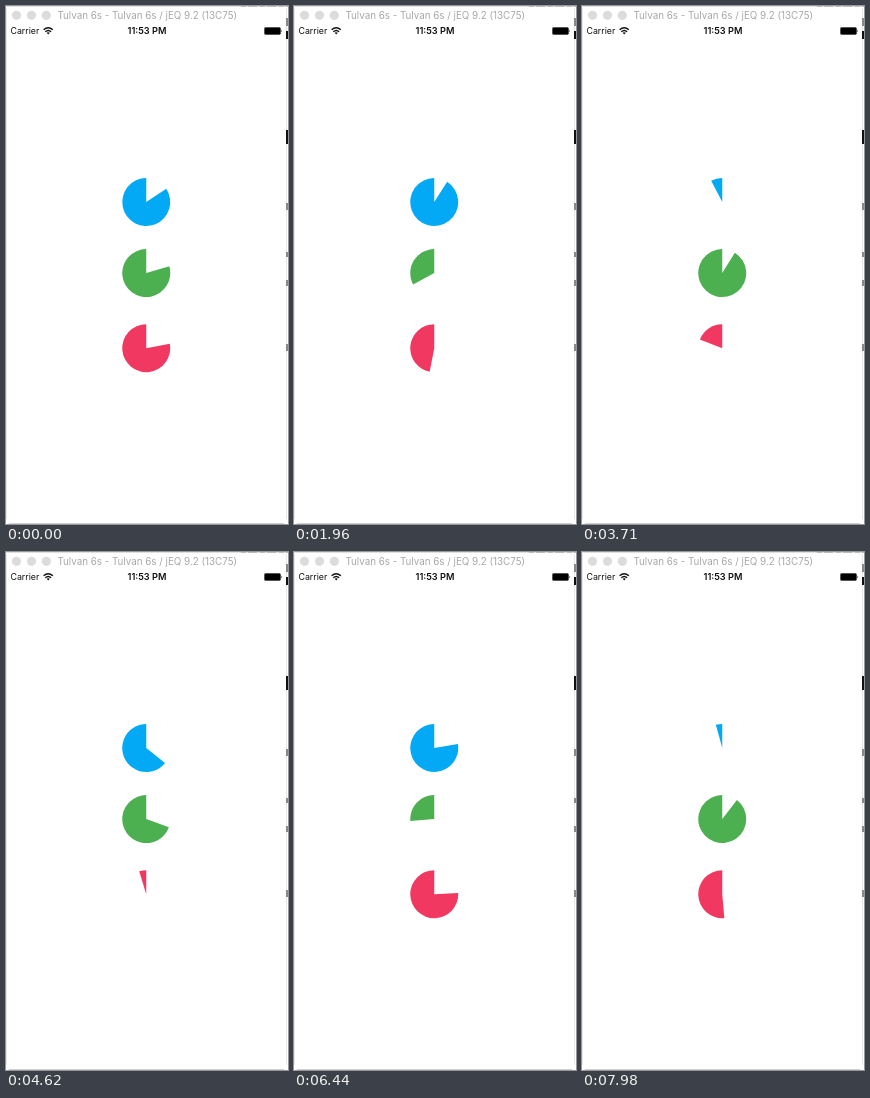
Animation of 282x518 px, one loop 8000 ms. Source, as an HTML page:

```html
<!DOCTYPE html>
<html lang="en">
<head>
<meta charset="utf-8">
<title>Pie timers</title>
<style>
  html, body { margin: 0; width: 100%; height: 100%; overflow: hidden; background: #fff; }
  svg { display: block; }
  text { font-family: Inter, Roboto, sans-serif; }
</style>
</head>
<body>
<svg width="282" height="518" viewBox="0 0 282 518">
  <rect width="282" height="518" fill="#fff"/>

  <!-- window edges and the page behind them -->
  <path d="M.5 2V513M280.5 2V513" stroke="#e8e8e8"/>
  <path d="M3 517.5H278" stroke="#cfcfcf"/>
  <path d="M0 .5H282" stroke="#e0e0e0"/>
  <path d="M235 .5H282" stroke="#bbb" stroke-dasharray="5 2 9 3"/>
  <path d="M281 25v8M281 124v14" stroke="#111" stroke-width="2"/>
  <path d="M281 12v8M281 197v7M281 246v5M281 274v6M281 338v7" stroke="#888" stroke-width="2"/>

  <!-- title bar -->
  <g fill="#dcdcdc">
    <circle cx="10.5" cy="9.3" r="4.6"/>
    <circle cx="25.5" cy="9.3" r="4.6"/>
    <circle cx="40.3" cy="9.3" r="4.6"/>
  </g>
  <text x="51.4" y="13" font-size="9.8" fill="#a8a8a8">Tulvan 6s - Tulvan 6s / jEQ 9.2 (13C75)</text>

  <!-- status bar -->
  <text x="4.5" y="28" font-size="8.8" fill="#111">Carrier</text>
  <text x="141" y="28" font-size="9.2" font-weight="600" text-anchor="middle" fill="#111">11:53 PM</text>
  <g fill="none" stroke="#111" stroke-width="1.4">
    <path d="M37.6 23.8Q42.2 19.6 46.8 23.8M39.3 25.7Q42.2 23.1 45.1 25.7"/>
    <path d="M40.6 26.8Q42.2 25.6 43.8 26.8L42.2 28.5Z" fill="#111" stroke="none"/>
  </g>
  <rect x="258.5" y="21.5" width="16" height="7" rx="1.2" fill="#000" stroke="#555"/>
  <path d="M275.2 23.6Q276.8 25 275.2 26.4Z" fill="#333"/>

  <g id="pies"></g>
</svg>
<script>
const LOOP = 8000, STEP = 70, CX = 140.25, R = 24;

// start: part already gone at time zero; steps: ticks per full turn
const pies = [
  { cy: 196, color: '#03a9f4', start: 0.157, steps: 30 },
  { cy: 267.1, color: '#4caf50', start: 0.2045, steps: 60 },
  { cy: 342.2, color: '#f03860', start: 0.2195, steps: 90 }
];

for (const pie of pies) {
  pie.path = document.createElementNS('http://www.w3.org/2000/svg', 'path');
  pie.path.setAttribute('fill', pie.color);
  document.getElementById('pies').append(pie.path);
}

function sector(cy, gone) {
  const angle = gone * 2 * Math.PI;
  const x = CX + R * Math.sin(angle), y = cy - R * Math.cos(angle);
  return `M${CX} ${cy}L${x} ${y}A${R} ${R} 0 ${gone < 0.5 ? 1 : 0} 1 ${CX} ${cy - R}Z`;
}

function draw(now) {
  const tick = Math.floor((now % LOOP) / STEP);
  for (const { path, cy, start, steps } of pies)
    path.setAttribute('d', sector(cy, (start + tick / steps) % 1));
  requestAnimationFrame(draw);
}
draw(0);
</script>
</body>
</html>
```
